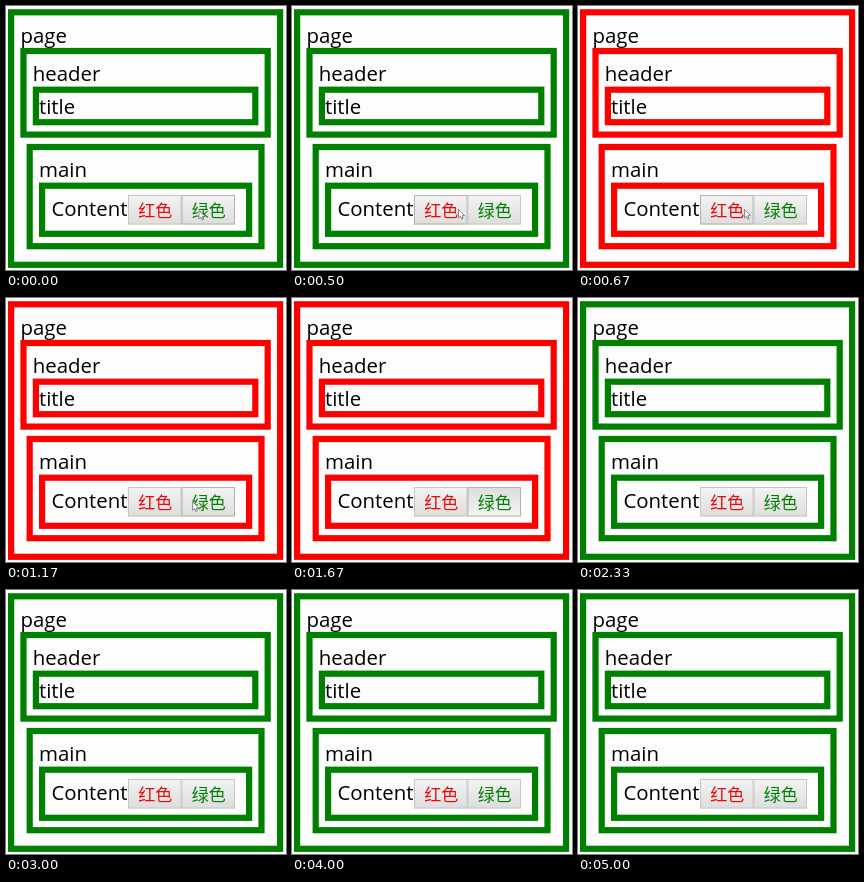
An HTML page with a canvas that plays this animation: 280 px wide and 264 px high, repeating every 5170 ms.

```html
<!DOCTYPE html>
<html lang="zh-CN">
<head>
<meta charset="utf-8">
<style>
  html, body { margin: 0; width: 100%; height: 100%; overflow: hidden; background: #fff; }
  canvas { display: block; }
</style>
</head>
<body>
<canvas id="stage" width="280" height="264"></canvas>
<script>
const ctx = document.getElementById('stage').getContext('2d');
const LOOP = 5170;
const STEPS_PER_SECOND = 6;
const UNIT = 6.2; // border, padding and gap share one size
const LINE = 26.3;
const ASCENT = 21;
const BUTTON = { width: 53.5, height: 29.5 };
const LATIN = '20.4px "Open Sans", "Noto Sans", sans-serif';
const CHINESE = '17px "Noto Sans CJK SC", "Noto Sans CJK", sans-serif';

const page = {
  label: 'page', padding: UNIT, children: [
    { label: 'header', padding: UNIT, children: [
      { label: 'title', padding: 0 }
    ] },
    { label: 'main', padding: UNIT, margin: UNIT, children: [
      { label: 'Content', padding: UNIT, buttons: true }
    ] }
  ]
};

const mix = (from, to, amount) => from + (to - from) * amount;
const progress = (value, from, to) => Math.min(1, Math.max(0, (value - from) / (to - from)));

function drawText(text, x, y, font, color) {
  ctx.font = font;
  ctx.fillStyle = color;
  ctx.fillText(text, x, y);
}

function drawButton(x, y, text, color, state) {
  const { width, height } = BUTTON;
  const shades = ['#f4f4f4', '#dddddd'];
  if (state === 'pressed') shades.reverse();
  const fill = ctx.createLinearGradient(0, y, 0, y + height);
  shades.forEach((shade, i) => fill.addColorStop(i, shade));
  ctx.fillStyle = fill;
  ctx.fillRect(x, y, width, height);
  ctx.strokeStyle = state === 'normal' ? '#c6c6c6' : '#b0b0b0';
  ctx.lineWidth = 1;
  ctx.strokeRect(x + 0.5, y + 0.5, width - 1, height - 1);
  drawText(text, x + 10.2, y + 22, CHINESE, color);
}

// Draws a box with its contents and returns its bottom edge.
function drawBox(box, left, top, right, look) {
  const inset = UNIT + box.padding;
  const x = left + inset;
  const y = top + inset;
  drawText(box.label, x, y + ASCENT, LATIN, '#000');

  let bottom = y + LINE;
  if (box.buttons) {
    drawButton(122, y, '红色', '#ee0808', look.redState);
    drawButton(122 + BUTTON.width, y, '绿色', '#008000', look.greenState);
    bottom = y + BUTTON.height;
  }
  for (const child of box.children || []) {
    const margin = child.margin || 0;
    bottom = drawBox(child, x + margin, bottom + margin, right - inset - margin, look) + margin;
  }
  bottom += inset;

  ctx.strokeStyle = look.frameColor;
  ctx.lineWidth = UNIT;
  ctx.strokeRect(left + UNIT / 2, top + UNIT / 2, right - left - UNIT, bottom - top - UNIT);
  return bottom;
}

function drawPointer(step) {
  if (step > 8) return;
  const toRed = progress(step, 0, 3);
  const toGreen = progress(step, 5, 8) ** 2;
  ctx.save();
  ctx.translate(mix(mix(193, 166.5, toRed), 212, toGreen), 204.5 - toRed + toGreen);
  const arrow = new Path2D('M0 0V8.5L2 6.7L3.3 9.6L4.6 9L3.4 6.2L6 6Z');
  ctx.fillStyle = '#fff';
  ctx.fill(arrow);
  ctx.strokeStyle = '#707070';
  ctx.lineWidth = 0.8;
  ctx.stroke(arrow);
  ctx.restore();
}

function render(time) {
  // A few ms of lead absorb the rounding of step times to 10 ms.
  const step = Math.floor((time + 4) * STEPS_PER_SECOND / 1000);
  const within = (first, end) => step >= first && step < end;
  const overGreen = step < 2 || within(7, 13);
  const look = {
    frameColor: within(4, 11) ? '#ff0000' : '#008000',
    redState: within(2, 7) ? 'hover' : 'normal',
    greenState: step === 10 ? 'pressed' : overGreen ? 'hover' : 'normal'
  };

  ctx.fillStyle = '#fff';
  ctx.fillRect(0, 0, 280, 264);
  ctx.fillStyle = '#fdfdfd';
  ctx.fillRect(4, 5, 272, 255);
  drawBox(page, 2, 3.2, 277.2, look);
  drawPointer(step);
}

const start = performance.now();
function tick() {
  render((performance.now() - start) % LOOP);
  requestAnimationFrame(tick);
}
tick();
</script>
</body>
</html>
```
